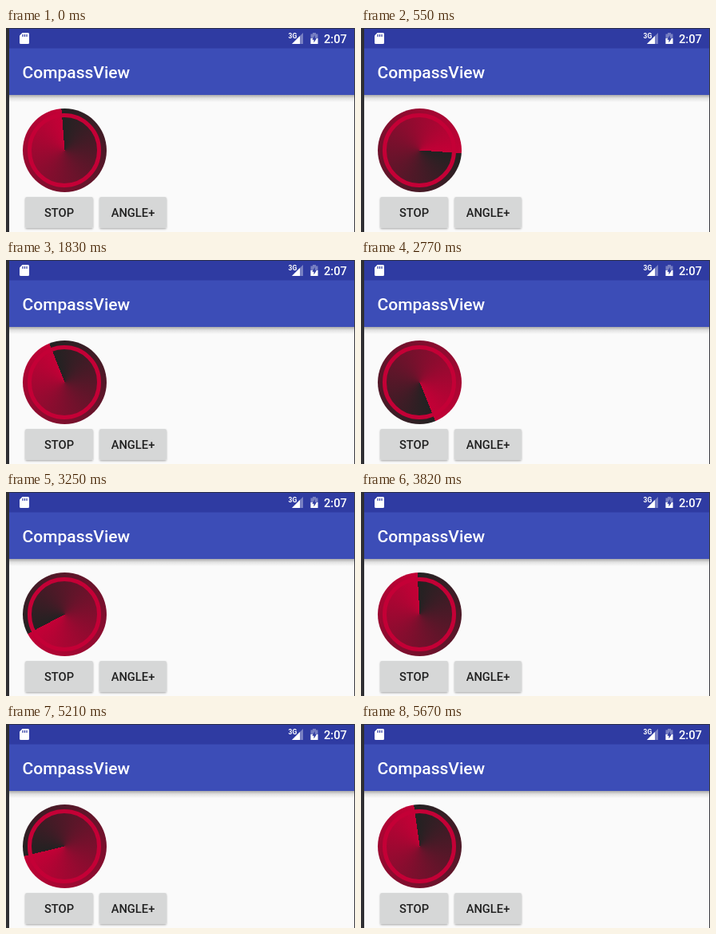
An HTML page for the animation above (5.77 s loop, 437x256 px).

```html
<!DOCTYPE html>
<html lang="en">
<head>
<meta charset="utf-8">
<title>CompassView</title>
<style>
html, body { margin: 0; width: 100%; height: 100%; overflow: hidden; background: #fafafa; }
svg { position: absolute; left: 0; top: 0; display: block; }
text { font-family: Roboto, sans-serif; font-weight: 500; }
#dial {
  position: absolute; left: 20.5px; top: 101px; width: 105px; height: 105px;
  border-radius: 50%;
  background: conic-gradient(from var(--a, -4.5deg), #222, #c40036);
}
#dial::after {
  content: ""; position: absolute; inset: 6.2px;
  border: 5px solid #c40036; border-radius: 50%;
}
</style>
</head>
<body>
<svg width="437" height="256" viewBox="0 0 437 256">
  <defs>
    <linearGradient id="shade" x2="0" y2="1">
      <stop stop-color="#000" stop-opacity=".32"/>
      <stop offset=".45" stop-color="#000" stop-opacity=".1"/>
      <stop offset="1" stop-color="#000" stop-opacity="0"/>
    </linearGradient>
    <filter id="lift" x="-10%" y="-10%" width="120%" height="130%">
      <feDropShadow dx="0" dy="1.3" stdDeviation="1" flood-opacity=".3"/>
    </filter>
  </defs>

  <rect y="84" width="437" height="9" fill="url(#shade)"/>
  <rect width="437" height="84" fill="#3c4db7"/>
  <rect width="437" height="25.5" fill="#2f3ba2"/>
  <rect width="437" height="1" fill="#2b2e4a"/>
  <rect width="4" height="256" fill="#2f2f33"/>
  <rect x="436" width="1" height="256" fill="#3a3a40"/>

  <!-- Status icons -->
  <g fill="#fff">
    <path d="M20.500 6H27.500Q29 6 29 7.500V18.500Q29 20 27.500 20H18.500Q17 20 17 18.500V9.500Z"/>
    <path d="M21 8v3M23.500 8v3M26 8v3" stroke="#2f3ba2" stroke-width="1.200"/>
    <text x="353.500" y="12.500" font-size="8.500" style="font-weight:700">3G</text>
    <path d="M372 6V20H358Z" opacity=".35"/>
    <path d="M368 10V20H358Z"/>
    <path d="M384 6h4v1.500h2.500V20h-9V7.500H384Z" opacity=".35"/>
    <path d="M381.500 13h9v7h-9Z"/>
    <path d="M386.800 9L383.300 14.700H385.500V18.500L389 12.700H386.800Z" fill="#2f3ba2"/>
    <text x="398" y="18.500" font-size="14.700">2:07</text>
    <text x="20.500" y="63" font-size="21">CompassView</text>
  </g>

  <g fill="#d6d7d7" filter="url(#lift)">
    <rect x="24" y="212" width="85" height="39" rx="2"/>
    <rect x="117" y="212" width="84" height="39" rx="2"/>
  </g>
  <g fill="#212121" font-size="14.700" text-anchor="middle">
    <text x="66.500" y="237">STOP</text>
    <text x="159" y="237">ANGLE+</text>
  </g>
</svg>
<div id="dial"></div>
<script>
const LOOP = 5770;
// Runs of redraws: first time, last time, count
const runs = [
  [60, 610, 11], [660, 1210, 11], [1260, 1830, 12], [1860, 2400, 11],
  [2460, 3030, 12], [3060, 3590, 11], [3650, 4190, 11], [4250, 4810, 12],
  [4860, 5380, 11], [5440, 5670, 5]
];
const ticks = runs.flatMap(([from, to, n]) =>
  Array.from({ length: n }, (_, i) => Math.floor((from + (to - from) * i / (n - 1)) / 10) * 10));

const dial = document.getElementById("dial");
const start = performance.now();

function draw() {
  const time = Math.max(0, performance.now() - start) % LOOP;
  const tick = ticks.findLast(t => t <= time);
  const angle = tick ? 0.191 * tick - 11 : -4.5;
  dial.style.setProperty("--a", angle + "deg");
  requestAnimationFrame(draw);
}
draw();
</script>
</body>
</html>
```
